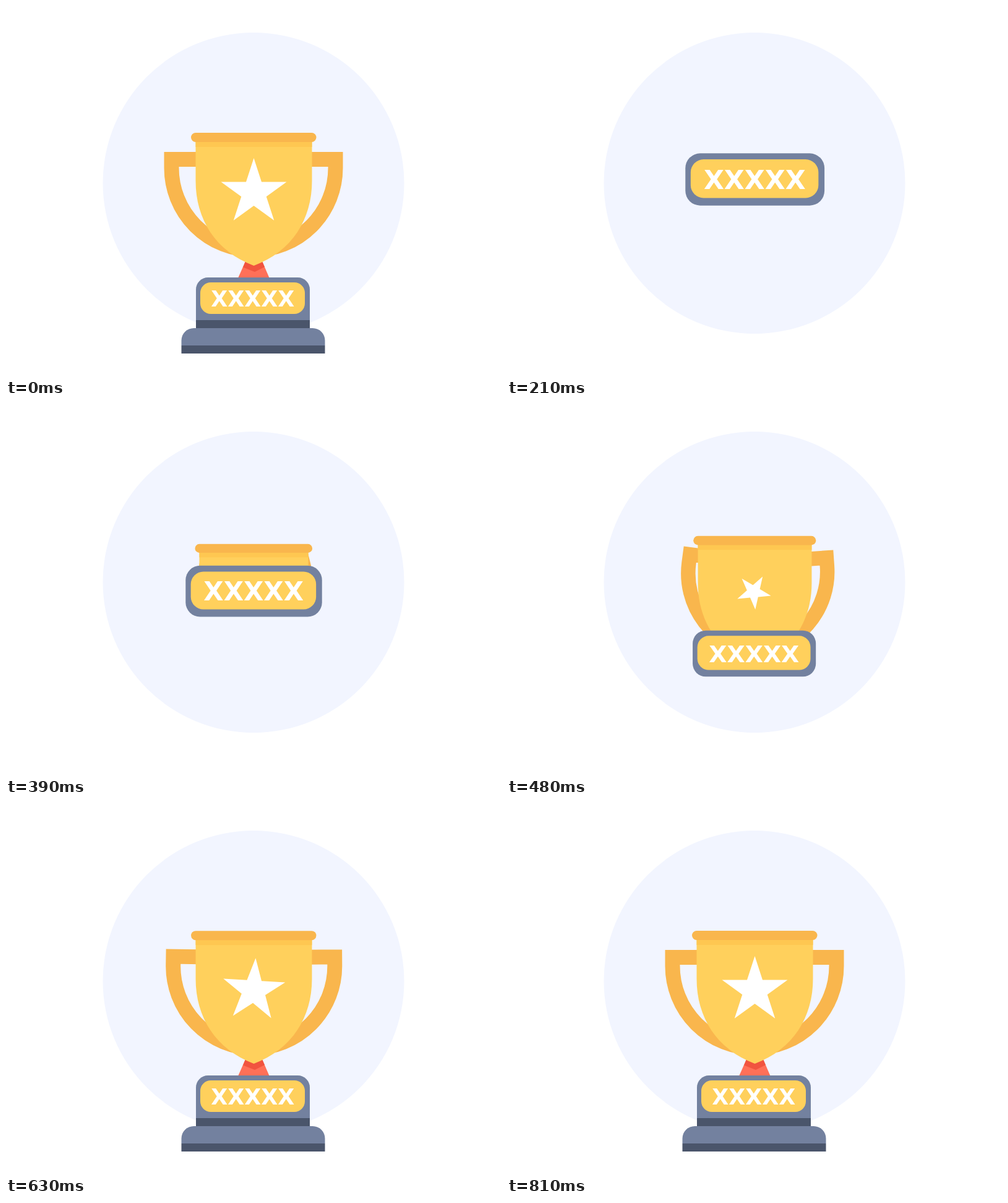
An HTML page for the animation above (840 ms loop, 800 by 600 pixels).

```html
<!DOCTYPE html>
<html lang="en">
<head>
<meta charset="utf-8">
<title>Trophy</title>
<style>
  html, body { margin: 0; width: 100%; height: 100%; overflow: hidden; background: #fff; }
  svg { display: block; width: 800px; height: 600px; }
  .handle { fill: none; stroke: #f9b64d; stroke-width: 24; }
  .slate { fill: #73819f; }
  .dark { fill: #4a556b; }
  .gold { fill: #ffd05c; }
  text { font: bold 35px "DejaVu Sans", sans-serif; fill: #fff; text-anchor: middle; }
</style>
</head>
<body>
<svg viewBox="0 0 800 600">
  <defs>
    <clipPath id="reveal"><rect id="curtain" width="800" height="600"/></clipPath>
    <path id="handle" d="M340 248H267.5V262A132.5 132.5 0 0 0 400 394.5"/>
  </defs>
  <circle cx="400" cy="286.5" r="243.5" fill="#f2f5ff"/>

  <g clip-path="url(#reveal)">
    <path d="M386.5 414H414.5L425.7 440H375Z" fill="#ff7058"/>
    <path d="M386.5 414H414.5L418 422L402 430L383 422.500Z" fill="#f1543f"/>
    <g id="cup">
      <g id="left"><use href="#handle" class="handle"/></g>
      <g transform="translate(800) scale(-1 1)">
        <g id="right"><use href="#handle" class="handle"/></g>
      </g>
      <path class="gold" d="M306.500 212H494.500V283C494.500 345 462 397 400.500 420C339 397 306.500 345 306.500 283Z"/>
      <rect x="306.500" y="218" width="188" height="10" fill="#fec751"/>
      <rect x="299" y="205" width="202.500" height="15" rx="7.500" fill="#f9b64d"/>
    </g>
    <polygon id="star" fill="#fff"/>
  </g>

  <g id="base">
    <path class="slate" d="M307 475H491V508H307Z"/>
    <path class="dark" d="M307 508H491V521H307Z"/>
    <path class="slate" d="M283.500 549V541a20 20 0 0 1 20-20h192a20 20 0 0 1 20 20v8z"/>
    <path class="dark" d="M283.500 549H515.500V562H283.500Z"/>
  </g>

  <g id="plate">
    <rect class="slate" x="307" y="439" width="184" height="69" rx="19.500"/>
    <rect class="gold" x="314" y="447" width="169" height="51" rx="17"/>
    <text x="398.700" y="486">XXXXX</text>
  </g>
</svg>
<script>
  const LOOP = 840, STEP = 30;
  const el = id => document.getElementById(id);
  const move = (id, value) => el(id).setAttribute('transform', value);
  const clamp = x => Math.min(1, Math.max(0, x));

  // Progress of the plate's slide, one value per step
  const slide = [0, .001, .004, .01, .02, .037, .063, .108, .2, .38, .63, .88, 1];
  // Share of the swing still to go, one value per step
  const settle = [1, .875, .485, .345, .25, .15, .088, .055, .035, .023, .014, .008, .004, 0];

  const sample = (list, time) => {
    const x = Math.min(list.length - 1, Math.max(0, time / STEP));
    const i = Math.floor(x);
    const next = list[i + 1] ?? list[i];
    return list[i] + (next - list[i]) * (x - i);
  };

  const radius = 55.7;
  el('star').setAttribute('points', Array.from({ length: 10 }, (_, i) => {
    const r = i % 2 ? radius * .382 : radius;
    const a = i * Math.PI / 5;
    return `${(r * Math.sin(a)).toFixed(2)},${(-r * Math.cos(a)).toFixed(2)}`;
  }).join(' '));

  function draw(t) {
    const p = sample(slide, t - 180);
    const y = 280.3 + 193.2 * p;
    const zoom = 1.222 - .222 * p;
    move('plate', `translate(${400.7 - 1.7 * p} ${y}) scale(${zoom}) translate(-399 -473.5)`);
    el('curtain').setAttribute('height', y);
    el('base').style.display = p < 1 ? 'none' : '';

    const size = 1 - .11 * (1 - clamp((t - 330) / 360)) ** 3;
    move('cup', `translate(400.4 517) scale(${size}) translate(-400.4 -517)`);

    const lead = sample(settle, t - 360);
    const lag = sample(settle, t - 420);
    move('right', `rotate(${16 * lead} 375 438)`);
    move('left', `rotate(${15.6 * lag} 375 438)`);
    move('star', `translate(${400.5 - 4 * lag} ${301.7 + lag}) rotate(${63 * lag}) scale(${1 - lag})`);
  }

  const start = performance.now();
  function tick() {
    const t = Math.floor((performance.now() - start) % LOOP / STEP) * STEP;
    draw(t || LOOP); // the loop opens on the finished trophy
    requestAnimationFrame(tick);
  }
  tick();
</script>
</body>
</html>
```
